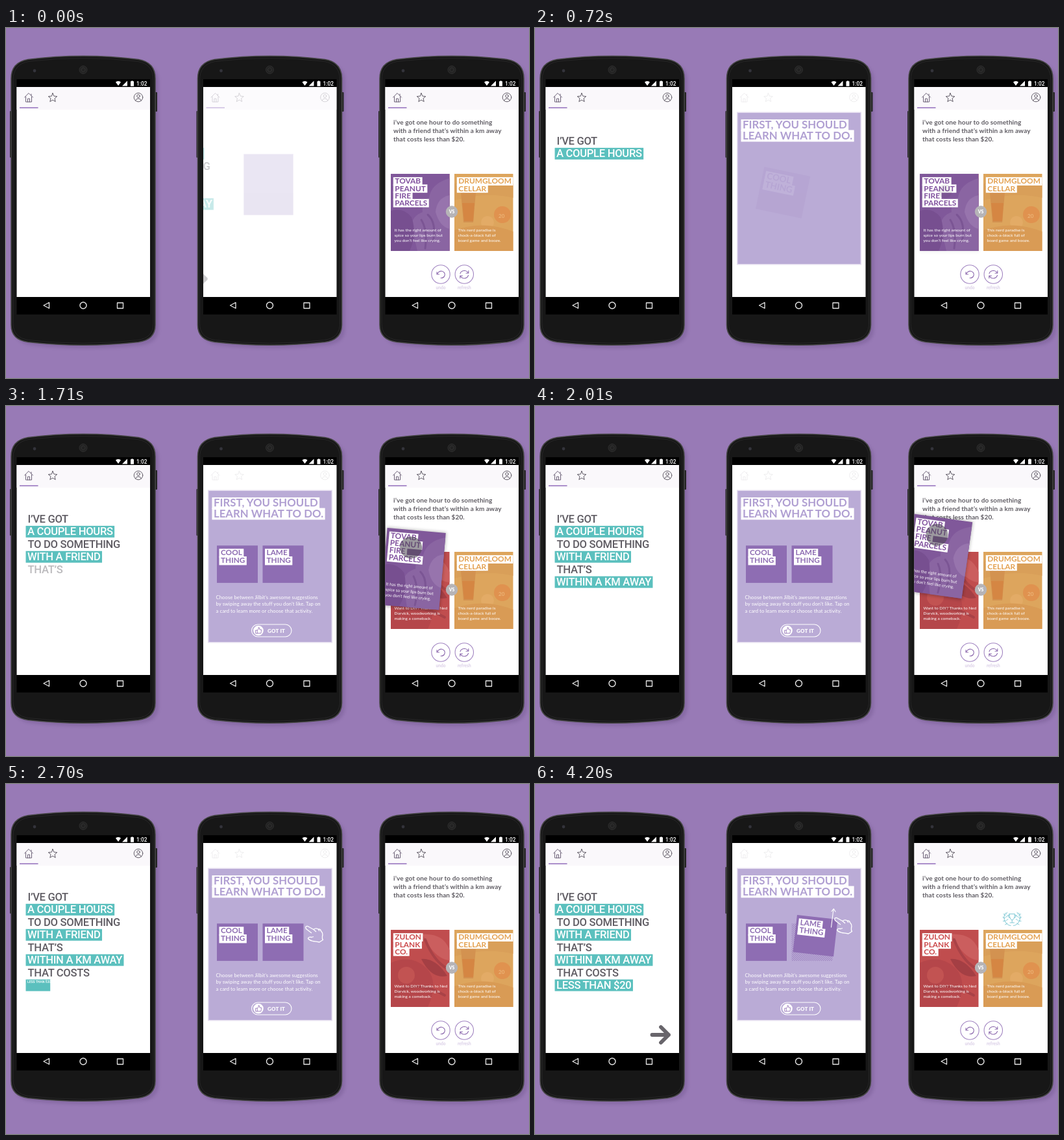
An HTML page that plays this animation: 806 by 540 pixels, repeating every 4230 ms.

```html
<!DOCTYPE html>
<html lang="en">
<head>
<meta charset="utf-8">
<title>Three phones</title>
<style>
html, body { margin: 0; width: 100%; height: 100%; overflow: hidden; background: #987ab6; }
svg { display: block; width: 806px; height: 540px; font-family: Lato, sans-serif; }
.bold { font-weight: 700; }
.sentence text { font-family: Roboto, sans-serif; font-weight: 500; letter-spacing: -.3px; }
.line { fill: none; stroke-linecap: round; stroke-linejoin: round; }
</style>
</head>
<body>
<svg id="stage" viewBox="0 0 806 540" xmlns="http://www.w3.org/2000/svg"></svg>
<script>
const LOOP = 4230;
const TEAL = '#5bc0be', INK = '#5f5c63', PURPLE = '#8e6db3', LILAC = '#baabd6', AQUA = '#62bccb';
const PHONE_X = [0, 287.5, 568];

const rect = (x, y, w, h, fill, more = '') =>
  `<rect x="${x}" y="${y}" width="${w}" height="${h}" fill="${fill}" ${more}/>`;
const circle = (x, y, r, more) => `<circle cx="${x}" cy="${y}" r="${r}" ${more}/>`;
const line = (d, color, width = 1, more = '') =>
  `<path class="line" d="${d}" stroke="${color}" stroke-width="${width}" ${more}/>`;
const shape = (d, fill, more = '') => `<path d="${d}" fill="${fill}" ${more}/>`;
const text = (x, y, size, fill, str, more = '') =>
  `<text x="${x}" y="${y}" font-size="${size}" fill="${fill}" ${more}>${str}</text>`;
const paragraph = (x, y, size, gap, fill, rows, more = '') =>
  rows.map((row, i) => text(x, y + i * gap, size, fill, row, more)).join('');
const group = (id, body, more = '') => `<g id="${id}" ${more}>${body}</g>`;

// Bold text on a box whose width follows the text.
const label = (x, base, size, box, ink, str, top, height) =>
  `<g class="label" data-pad="2.5">${rect(x - 2.5, base - top, 0, height, box)}` +
  text(x, base, size, ink, str, 'class="bold"') + '</g>';
const labels = (x, y, size, gap, ink, rows) =>
  rows.map((row, i) => label(x, y + i * gap, size, '#fff', ink, row, size * 0.85, gap + 1.6)).join('');

function toolbar() {
  return line('M28.5 107L35 100.5L41.5 107M30.5 106V114H39.5V106M33.5 114V109H36.5V114M39 102V104', '#6b6076') +
    line('M72 100.5L73.9 105.1L78.8 105.5L75 108.7L76.2 113.6L72 111L67.8 113.6L69 108.7L65.2 105.5L70.1 105.1Z', '#625d68') +
    circle(204, 107, 6.8, 'class="line" stroke="#625d68"') +
    circle(204, 105, 2.3, 'class="line" stroke="#625d68"') +
    line('M199.6 112Q200.5 108.8 204 108.8Q207.5 108.8 208.4 112', '#625d68');
}

function phone(i) {
  const outline = 'M8 78Q8 53 34 48.5Q119 38 204 48.5Q230 53 230 78V458Q230 481 204 484.5Q119 494 34 484.5Q8 481 8 458Z';
  const status = shape('M169 83.5Q173 80.7 177 83.5L173 89Z', '#fff') +
    shape('M179 89.5H187V81.5Z', '#fff') +
    shape('M192 82.3H193.3V81.4H195.7V82.3H197V89.8H192Z', '#fff') +
    text(201, 88.8, 8.3, '#fff', '1:02', 'font-family="Roboto, sans-serif" font-weight="500"');
  return `<g transform="translate(${PHONE_X[i]} 0)">` +
    shape(outline, '#4d3569', 'opacity=".22" transform="translate(5 5)" filter="url(#soft)"') +
    rect(6, 128, 4, 72, '#242424', 'rx="1"') + rect(229, 99, 4, 30, '#242424', 'rx="1"') +
    shape(outline, '#171717', 'stroke="#454545" stroke-width="1.6"') +
    line('M11 80Q11 56 35 51.5Q119 41.5 203 51.5Q227 56 227 80V456Q227 478 203 481.5Q119 491 35 481.5Q11 478 11 456Z', '#262626') +
    circle(44, 66, 2.4, 'fill="#33333b"') +
    circle(119, 64.5, 6, 'fill="#222" stroke="#303030"') +
    circle(119, 64.5, 3, 'class="line" stroke="#383838" stroke-dasharray="1 1"') +
    rect(16.5, 79, 205.5, 363, '#000') + status +
    rect(16.5, 91, 205.5, 324, '#fff') +
    group('bar' + i, rect(16.5, 91, 205.5, 35, '#faf8fb') + rect(21, 122, 28.5, 2, '#ac90cc')) +
    group('icons' + i, toolbar()) +
    line('M66.5 423.5V432.5L58 428Z', '#e8e8e8', 1.3) +
    circle(119, 428, 5, 'class="line" stroke="#e8e8e8" stroke-width="1.4"') +
    line('M171.5 424H180.5V432.5H171.5Z', '#e8e8e8', 1.3) + '</g>';
}

// Sentence on the first phone: plain and highlighted rows alternate.
const ROWS = ['I’VE GOT', 'A COUPLE HOURS', 'TO DO SOMETHING', 'WITH A FRIEND',
  'THAT’S', 'WITHIN A KM AWAY', 'THAT COSTS', 'LESS THAN $20'];
const rowBase = i => 180 + i * 19.45;
const sentence = id => '<g class="sentence">' + ROWS.map((row, i) => group(id + i, i % 2
  ? label(33, rowBase(i), 16.6, TEAL, '#fff', row, 14.6, 18)
  : text(33.5, rowBase(i), 16.6, INK, row))).join('') + '</g>';
const nextArrow = id => group(id, line('M180.5 387H206M194 375L206 387L194 399', '#68656b', 5.8));

const choice = (x, word, id) => group(id, rect(x, 215.3, 63, 57.6, PURPLE) +
  labels(x + 6, 230.3, 11.8, 11.8, PURPLE, [word, 'THING']));

function lesson() {
  const hand = 'M471 230L462.5 223.5Q460.3 219 465 219.5L474 224.5Q477.5 221.5 481 224Q485 223.5 485.5 227' +
    'Q489 230 487.5 235Q487 239 488.5 240.5L483 244Q478 243 473 242.5Q466 240.5 465.5 238Q467 235.5 471 236.5L474 235.5M474 224.5L478 228M481 224L483 227';
  const thumb = 'M385 346H387.2V350.8H385ZM387.2 346.2L389 344L389.2 341.5Q391.2 341.4 390.9 345H393.6L393 350.6H387.2';
  return group('panel', rect(312.5, 131, 189, 233, LILAC, 'stroke="#cfc4e3" stroke-opacity=".55" stroke-width="3" paint-order="stroke"')) +
    group('title', labels(320, 155.3, 16.8, 16.4, '#b09fd2', ['FIRST, YOU SHOULD', 'LEARN WHAT TO DO.'])) +
    rect(395.5, 215.3, 63, 57.6, 'url(#hatch)', 'id="slot"') +
    choice(325, 'COOL', 'cool') + choice(395.5, 'LAME', 'lame') +
    group('advice', paragraph(323.5, 298, 7.7, 10.3, '#fff', [
      'Choose between Jilbit’s awesome suggestions',
      'by swiping away the stuff you don’t like. Tap on',
      'a card to learn more or choose that activity.'], 'letter-spacing=".06"') +
      rect(378.5, 337, 61.5, 19, 'none', 'rx="9.5" stroke="#fff" stroke-width="1.1"') +
      circle(389, 346.5, 7.8, 'fill="#fff"') + line(thumb, PURPLE, 0.8) +
      text(403, 349.6, 8, '#fff', 'GOT IT', 'font-weight="900" letter-spacing=".2"')) +
    group('swipe', line('M456.5 221L460 193M457 196.5L460.3 192.5L463 197', '#fff', 1.1)) +
    group('hand', shape(hand, LILAC, 'stroke="#fff" stroke-width="1.3" stroke-linejoin="round"'));
}

function card(x, color, ink, name, copy, art) {
  return rect(x, 225, 90.5, 119, color) + art + labels(x + 6.3, 240.3, 11.9, 11.2, ink, name) +
    paragraph(x + 5.5, 313.5, 6.5, 8.4, '#fff', copy);
}

function trophy() {
  const laurel = line('M725 199Q720.5 206 725 213Q728 218 733 218.5M725 203L722 200.5M724 207L721 205.5' +
    'M725 211L721.5 211.5M728 215L724.5 217M726 201L727.5 198M725 206L728 203.5M726.5 210.5L729 208.5', AQUA, 0.8);
  return laurel + `<g transform="translate(1470.5 0) scale(-1 1)">${laurel}</g>` +
    line('M731 200.5H739.5Q739.5 208.5 735.2 210Q731 208.5 731 200.5ZM731 202.5H728.8Q729 206 732 206.5' +
      'M739.5 202.5H741.7Q741.5 206 738.5 206.5M735.2 210V213.5M732 214H738.5', AQUA, 0.8);
}

function picks() {
  const spicy = shape('M683.5 232Q655 240 652 262Q640 266 642 284Q626 290 625 305L634 344H683.5Z', '#8a65a2') +
    shape('M683.5 258Q664 262 662 284Q668 306 683.5 310Z', '#9774ad') +
    shape('M593 282Q612 276 625 292Q634 318 622 344H593Z', '#774f90') +
    line('M650 288Q664 300 658 330M640 296Q650 312 646 340', '#7b5594', 3);
  const games = shape('M691 240H781.5V262Q740 252 691 266Z', '#d99f59') +
    shape('M701 254H724L720 300H705Z', '#d39250') + shape('M703 270H722L720 298H706Z', '#d58643') +
    circle(765, 288, 13, 'fill="#e0924f"') + circle(742, 300, 10, 'fill="#e3ab66"') +
    text(759, 293, 8, '#ebb478', '20', 'class="bold"') +
    shape('M691 312Q735 296 781.5 314V344H691Z', '#d99b55');
  const wood = shape('M593 276Q625 262 648 284Q668 306 650 344H593Z', '#b5464a') +
    shape('M642 232Q674 230 683.5 256V272Q660 270 642 232Z', '#cb5e5e') +
    shape('M640 270Q662 268 680 296Q656 302 640 270Z', '#a43f44') +
    circle(617, 295, 13, 'fill="#c25352"') +
    line('M600 324Q630 300 676 326M646 240Q660 276 683 286', '#a94247', 4);
  const ring = x => circle(x, 380, 14.2, 'class="line" stroke="#a184c1" stroke-width="1.1"');
  return paragraph(597, 149, 10, 12.8, INK, ['i’ve got one hour to do something',
      'with a friend that’s within a km away', 'that costs less than $20.'], 'class="bold" letter-spacing=".1"') +
    group('trophy', trophy()) +
    card(593, '#c04d4e', '#cc4a4c', ['ZULON', 'PLANK', 'CO.'],
      ['Want to DIY? Thanks to Ned', 'Dorvick, woodworking is', 'making a comeback.'], wood) +
    card(691, '#dda55d', '#e4a252', ['DRUMGLOOM', 'CELLAR'],
      ['This nerd paradise is', 'chock-a-block full of', 'board game and booze.'], games) +
    group('toss', rect(592, 224, 92.5, 122, '#000', 'id="lift" filter="url(#soft)"') +
      card(593, '#80589a', '#80509e', ['TOVAB', 'PEANUT', 'FIRE', 'PARCELS'],
        ['It has the right amount of', 'spice so your lips burn but', 'you don’t feel like crying.'], spicy) +
      circle(632, 252, 17, 'id="touch" fill="#4b4650"')) +
    circle(687, 283.5, 9.2, 'fill="#b6b4b7"') +
    text(687, 286, 6.8, '#fff', 'VS', 'text-anchor="middle" font-weight="900"') +
    ring(670) + ring(706.3) +
    line('M664 376.5V380H667.6M664.5 379.5Q667 374.5 672 375.2Q676.5 376.5 676.3 381Q675 386 670 385.8', '#8f6db0', 1.1) +
    line('M700 379Q701 374.5 706.5 374.2Q710.5 374.5 712.3 378M712.8 374.5V378.2H709M712.6 381.5Q711 386 706.2 386.2Q702 386 700.3 382.4M699.8 386V382.2H703.5', '#8f6db0', 1.1) +
    ['undo', 'refresh'].map((word, i) => text(670 + 36.3 * i, 402.6, 6.6, '#d9cde6', word,
      'class="bold" text-anchor="middle"')).join('');
}

const clip = (i, body) => `<g clip-path="url(#screen${i})">${body}</g>`;
const stage = document.getElementById('stage');
stage.innerHTML = '<defs><filter id="soft" x="-20%" y="-20%" width="140%" height="140%"><feGaussianBlur stdDeviation="2.5"/></filter>' +
  `<pattern id="hatch" width="3" height="3" patternUnits="userSpaceOnUse"><path d="M-1 1L1 -1M0 3L3 0M2 4L4 2" stroke="${PURPLE}" stroke-width=".8"/></pattern>` +
  PHONE_X.map((x, i) => `<clipPath id="screen${i}">${rect(16.5 + x, 91, 205.5, 324, '#fff')}</clipPath>`).join('') + '</defs>' +
  rect(0, 0, 806, 540, '#987ab6') + PHONE_X.map((_, i) => phone(i)).join('') +
  clip(0, sentence('row') + nextArrow('arrow')) +
  clip(1, group('leaving', sentence('old') + nextArrow('oldArrow')) + lesson()) +
  clip(2, picks());

function fitLabels() {
  for (const el of stage.querySelectorAll('.label')) {
    const [box, words] = el.children;
    box.setAttribute('width', words.getComputedTextLength() + 2 * el.dataset.pad);
  }
}
fitLabels();

const $ = id => document.getElementById(id);
const set = (id, name, value) => $(id).setAttribute(name, value);
const fade = (id, value) => set(id, 'opacity', value);
const move = (id, value) => set(id, 'transform', value);
const span = (t, from, length) => Math.min(1, Math.max(0, (t - from) / length));
const easeOut = p => 1 - (1 - p) ** 3;
const easeInOut = p => 0.5 - 0.5 * Math.cos(Math.PI * p);
const mix = (a, b, p) => a + (b - a) * p;
const scaleAt = (x, y, sx, sy = sx) => `translate(${x} ${y}) scale(${sx} ${sy}) translate(${-x} ${-y})`;

function drawSentence(t) {
  ROWS.forEach((_, i) => {
    const highlight = 315 + 785 * (i >> 1);
    if (i % 2 === 0) return fade('row' + i, span(t, highlight - 250, 180));
    const p = span(t, highlight - 5, 115);
    const [box, words] = $('row' + i).firstChild.children;
    const top = rowBase(i) - 13;
    fade('row' + i, p > 0 ? 1 : 0);
    box.setAttribute('transform', scaleAt(30.5, top, p, 1));
    words.setAttribute('transform', scaleAt(33, top, p));
  });
  const p = span(t, 3560, 340);
  fade('arrow', p);
  move('arrow', `translate(${-83 * (1 - easeOut(p))} 0)`);
}

function flyIn(id, x, start, t) {
  const p = span(t, start, 250), q = 1 - easeInOut(p);
  fade(id, p);
  move(id, `translate(${26 * q} ${10 * q}) rotate(${12 * q} ${x} 244) ${scaleAt(x, 244, 1 + 0.15 * q)}`);
}

function drawLesson(t) {
  const out = span(t, 0, 150);
  fade('leaving', 0.35 * (1 - out));
  move('leaving', `translate(${139 - 60 * out} 0)`);
  move('oldArrow', 'translate(-37 0)');
  fade('bar1', 0.45 * (1 - span(t, 0, 300)));
  fade('icons1', mix(0.25, 0.11, span(t, 0, 400)));

  const grow = easeOut(span(t, 0, 500));
  fade('panel', mix(0.3, 1, span(t, 0, 450)));
  move('panel', `translate(${-2.5 * (1 - grow)} ${-6 * (1 - grow)}) ${scaleAt(407, 247.5, mix(0.398, 1, grow))}`);
  fade('title', span(t, 380, 190));
  flyIn('cool', 356.5, 700, t);
  fade('advice', span(t, 1165, 300));
  fade('hand', span(t, 2300, 250));

  const drag = easeInOut(span(t, 3130, 650));
  if (t < 3130) flyIn('lame', 427, 850, t);
  else move('lame', `translate(${5 * drag} ${-10 * drag}) rotate(${6.5 * drag} 427 244)`);
  fade('slot', drag > 0 ? 1 : 0);
  move('hand', `translate(0 ${-13 * drag})`);
  fade('swipe', span(t, 3230, 400));
}

function drawPicks(t) {
  const drag = 1.2 * span(t, 1200, 960);
  const away = easeInOut(span(t, 2160, 260));
  const x = mix(-17 * drag, -150, away), y = mix(-52 * drag, -108, away), turn = mix(8 * drag, 14, away);
  const press = span(t, 650, 350);
  move('toss', `translate(${x} ${y}) rotate(${turn} 638 284.5)`);
  fade('toss', away < 1 ? 1 : 0);
  fade('lift', 0.25 * press);
  fade('touch', 0.55 * press * (1 - away));
  set('touch', 'r', mix(9, 17, press));
  fade('trophy', span(t, 3220, 450));
}

const start = performance.now();
function frame() {
  const t = (performance.now() - start) % LOOP;
  drawSentence(t);
  drawLesson(t);
  drawPicks(t);
  requestAnimationFrame(frame);
}
frame();
</script>
</body>
</html>
```
